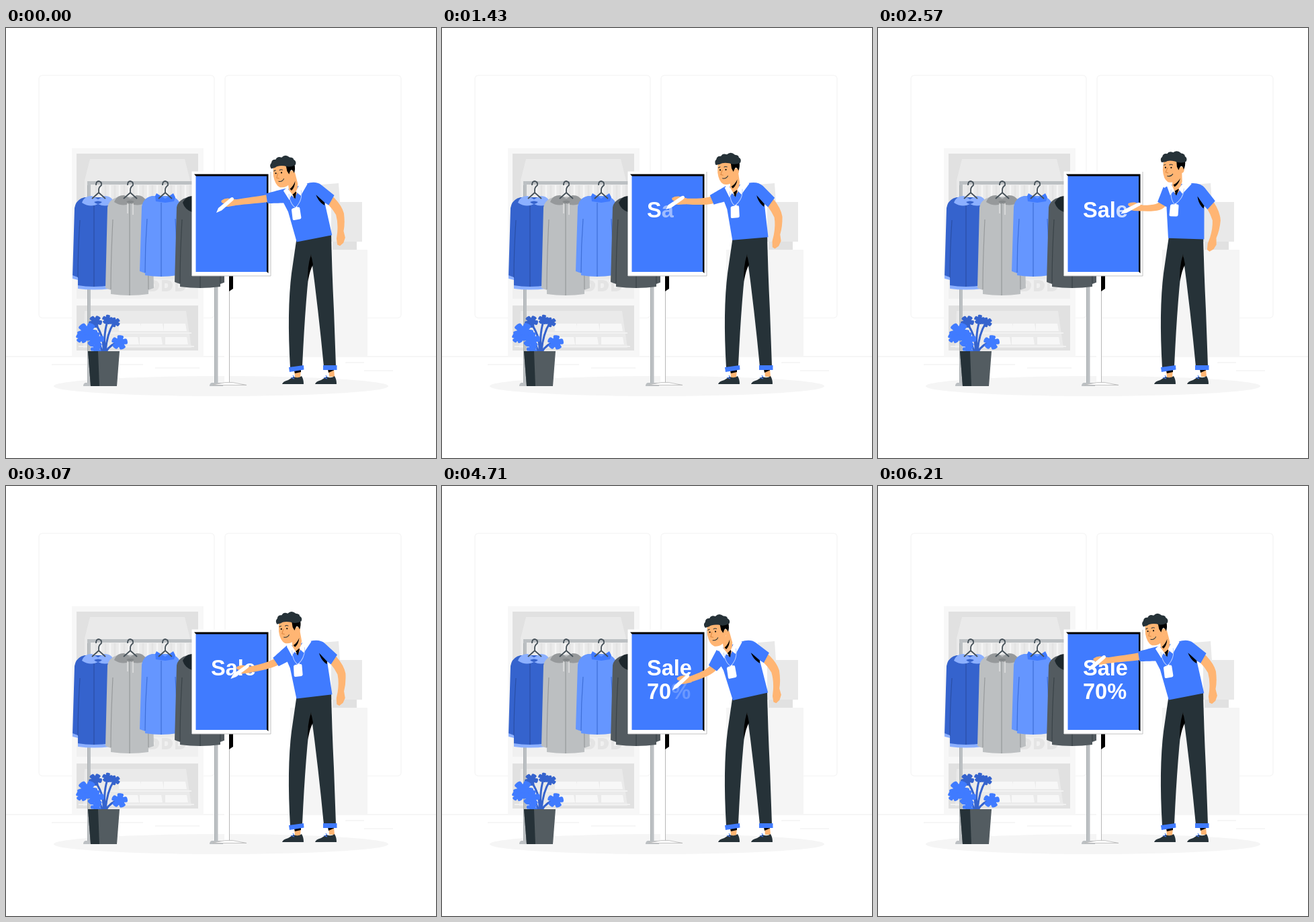
Write an HTML page that moves like this. It is 640 px wide and 640 px high and loops after 6430 ms.

```html
<!DOCTYPE html>
<html lang="en">
<head>
<meta charset="utf-8">
<title>Shop sign</title>
<style>
html, body { margin: 0; width: 100%; height: 100%; overflow: hidden; background: #fff; }
svg { display: block; width: 100%; height: 100%; }
.sign { font: bold 32.5px "Liberation Sans", Arial, sans-serif; fill: #fff; }
</style>
</head>
<body>
<svg viewBox="0 0 640 640">
  <!-- wall and floor -->
  <g fill="none" stroke="#f6f6f6" stroke-width="1.5">
    <rect x="49" y="70.5" width="261" height="361" rx="5"/>
    <rect x="326" y="70.5" width="262" height="361" rx="5"/>
    <path d="M0 489H640M68 501H204M222 506H288M505 498H533M533 510H576" stroke="#f3f3f3"/>
  </g>
  <!-- shelf -->
  <path d="M98 179H294V489H98Z" fill="#f7f7f7"/>
  <path d="M105 187H286V403H105ZM105 413H286V480H105Z" fill="#e1e1e1"/>
  <path d="M125 195H266L274 227V400H117V227ZM117 421H268L276 476H115Z" fill="#eaeaea"/>
  <path d="M105 374H286V403H105Z" fill="#f0f0f0"/>
  <g id="folds"></g>
  <g id="crates"></g>
  <!-- counter -->
  <path d="M423 330H538V489H423Z" fill="#f5f5f5"/>
  <path d="M470 233L495 231L497 260H470Z" fill="#e9e9e9"/>
  <path d="M484 259H530V318H484Z" fill="#e9e9e9"/>
  <path d="M486 318H522V330H486Z" fill="#e1e1e1"/>
  <ellipse cx="320" cy="533" rx="249" ry="15" fill="#f5f5f5"/>
  <!-- clothes rail -->
  <path d="M123.500 531V230.500H313V531" fill="none" stroke="#bcc0c3" stroke-width="5"/>
  <path d="M121.500 234V529M310.500 234V529" stroke="#a8adb0"/>
  <path d="M118 528H133Q136 530 135 533H115Q115 529 118 528ZM306 528H321Q324 530 323 533H303Q303 529 306 528Z" fill="#bcc0c3"/>
  <g id="rack"></g>
  <!-- plant -->
  <path d="M145 482Q146 455 130 437M147 482Q145 452 152 434M148 482Q150 455 161 438M143 482Q138 460 121 455M149 482Q155 470 170 467" fill="none" stroke="#3563cd" stroke-width="3"/>
  <g id="leaves"></g>
  <path d="M122 481H169L165 533H126Z" fill="#535c61"/>
  <path d="M122 481H137L139 533H126Z" fill="#263238"/>
  <!-- board -->
  <path d="M325 369H332.500V528H325Z" fill="#fff"/>
  <path d="M332.500 390V528" stroke="#b8b8b8"/>
  <path d="M332 369H338V388L332 392Z"/>
  <path d="M308 531L327 527.500H337L358 531.500H308Z" fill="#fff" stroke="#b5b5b5" stroke-width=".8"/>
  <path d="M276.500 213.500H394V369H276.500Z" fill="#fff"/>
  <path d="M394 214V369H277" fill="none" stroke="#bdbdbd" stroke-width=".9"/>
  <path d="M280 217.500H390.500V365L386 361V222H284Z"/>
  <path d="M282.500 220.500H388V363H282.500Z" fill="#407bff"/>
  <text class="sign" x="305" y="282" id="top"></text>
  <text class="sign" x="305" y="316.5" id="low"></text>
  <!-- legs -->
  <path d="M433 310L484 304Q485 360 488 420L491 503L473 504Q465 420 454 338Q446 395 441 503L423 506Q418 420 425 365Z" fill="#263238"/>
  <path d="M454 337L457 352Q452 361 449.500 377Q448 356 454 337Z"/>
  <path d="M429 509L439 508L438 520H430ZM480 507H488L489 519H481Z" fill="#ffb573"/>
  <path d="M429 510L439 508.500V512L430 514ZM479 508H488V509.500L480 513Z"/>
  <path d="M421 505L443 502L443.500 508.500L422 512ZM472 502H492.500V509H472Z" fill="#407bff"/>
  <g id="shoe"><path d="M411 530Q412 526 420 524L428 519Q435 522 440 518Q443 523 443 530Z" fill="#263238"/><path d="M424 520L429 522M427 517L429 520" stroke="#407bff" stroke-width="1.2"/></g>
  <use href="#shoe" x="49"/>
  <!-- writing arm -->
  <path id="fore" fill="#ffb573"/>
  <path id="sleeve" fill="#407bff"/>
  <g id="hand">
    <path d="M29 -20L17 -21.500Q11 -21 7.500 -18Q7 -14 12 -14L8 -11Q11 -8.500 18 -9L29 -11Z" fill="#ffb573"/>
    <path d="M0 0L3 -7L20.500 -21.500Q24 -24 25.500 -22Q27 -20 24 -17.500L8 -3.500Z" fill="#fff"/>
  </g>
  <!-- upper body, drawn upright -->
  <g id="body">
    <path d="M488 267L498 258Q508 272 509 285Q508 300 503.500 311L504 321L500 328L494 331.500L490.500 329L491 320L494 311Q498 297 497 285Q494 276 488 267Z" fill="#ffb573"/>
    <path d="M425 238L433 234L462 231Q477 229 484 237L500 256L489 269L484 264L485.500 313.500H432L428 267L423 250Z" fill="#407bff"/>
    <path d="M473.500 250Q475 261 483 268L484 264Z"/>
    <path d="M436 224L449 211L450 229L446 243L441 249L435 240Z" fill="#ffb573"/>
    <path d="M437 234Q443 231 447 224Q445 233 439 237ZM446 239L442 250L438 244Z"/>
    <path d="M433 231L441 247L437 244L433 250L427 235ZM450 233L459 224L464 232L451 247L445 240Z" fill="#fff"/>
    <path d="M434 241Q433 257 440 263Q453 254 453 239" fill="none" stroke="#b9d0ff"/>
    <path d="M437 263H440Q442 260 443 263H444Q446 263 446 265L445.500 279Q445 281 443 281H434.500Q432.500 281 432.500 279L433.500 265Q434 263 437 263Z" fill="#fff"/>
    <g id="head">
      <path d="M421 198L420 212Q421 226 428 230Q437 232 443 226L447 216Q452 217 452 210Q450 205 446 208L445 197Z" fill="#ffb573"/>
      <path d="M440 197H453Q454 206 451 211Q450 206 447 206Q445 208 443.500 212L441 207Z"/>
      <path d="M418 201Q415 196 419 192.500Q420 187 426 188Q429 183 435 186Q441 181 447 187Q453 188 452.500 191Q457 194 454.500 199Q446 203 438 199Q428 197 424 200Z" fill="#263238"/>
      <g fill="none" stroke="#263238" stroke-linecap="round">
        <path d="M421.500 205L424 204M430 204.500Q432 203 434.500 204.500"/>
        <path d="M427 209L424.500 215.500L428 216.500" stroke="#d9863f"/>
        <path d="M427 221Q432 222.500 435 218"/>
      </g>
      <circle cx="424" cy="208.500" r="1.100"/><circle cx="432.500" cy="208.500" r="1.100"/>
    </g>
  </g>
</svg>
<script>
const $ = id => document.getElementById(id);
const svgNS = 'http://www.w3.org/2000/svg';
const path = (d, fill, extra = '') => `<path d="${d}" fill="${fill}" ${extra}/>`;
const line = (d, color, w = 1) => path(d, 'none', `stroke="${color}" stroke-width="${w}"`);

// ---- still props ----
function hanger(x) {
  return line(`M${x - 4} 234Q${x - 4} 228 ${x} 228Q${x + 5} 229 ${x + 4} 234Q${x} 237 ${x} 241V245L${x - 10} 254M${x} 245L${x + 10} 254`, '#455058', 1.8);
}

function jacket(cx, top, hw, cuff, hem, body, shade) {
  const l = cx - hw, r = cx + hw;
  return path(`M${cx - 14} ${top}Q${l + 5} ${top + 3} ${l + 3} ${top + 16}L${l} ${cuff - 2}L${l + 8} ${cuff + 1}L${l + 8} ${hem - 2}` +
    `Q${cx} ${hem + 2} ${r - 8} ${hem - 2}L${r - 8} ${cuff + 1}L${r} ${cuff - 2}L${r - 3} ${top + 16}Q${r - 5} ${top + 3} ${cx + 14} ${top}Z`, body) +
    line(`M${l + 11} ${top + 34}Q${l + 8} ${cuff - 40} ${l + 8} ${cuff}M${r - 11} ${top + 34}Q${r - 8} ${cuff - 40} ${r - 8} ${cuff}M${cx} ${top + 10}V${hem}`, shade, 1.2);
}

function hood(x, y, fill, inner) {
  return path(`M${x - 24} ${y + 8}Q${x - 20} ${y - 3} ${x - 9} ${y - 2}L${x} ${y + 3}L${x + 9} ${y - 2}Q${x + 20} ${y - 3} ${x + 24} ${y + 8}Q${x + 12} ${y + 16} ${x} ${y + 10}Q${x - 12} ${y + 16} ${x - 24} ${y + 8}Z`, fill) +
    path(`M${x - 6} ${y + 7}Q${x} ${y + 4} ${x + 6} ${y + 7}Q${x} ${y + 13} ${x - 6} ${y + 7}Z`, inner);
}

let strips = '';
for (let x = 134; x < 276; x += 7) strips += line(`M${x} 234V256`, x % 2 ? '#f5f5f5' : '#e3e3e3', 2.5);
$('rack').innerHTML = strips +
  jacket(131, 252, 32, 372, 388, '#3563cd', '#2a4fa6') +
  path('M107 383Q130 387 156 383V388Q130 391 107 388ZM99 368L107 371V375L99 373Z', '#8cb0ff') +
  hood(137, 252, '#8cb0ff', '#3563cd') +
  jacket(184, 251, 36, 389, 398, '#bcbfc1', '#96999b') +
  hood(185, 251, '#96999b', '#84888a') +
  line('M181 261V276M189 261V278', '#e5e5e5', 1.3) +
  jacket(231, 250, 32, 364, 370, '#6596ff', '#3e6fd8') +
  path('M222 250L224 246L237 254L249 246L252 252L250 258L237 260L223 258Z', '#407bff') +
  jacket(289, 251, 38, 380, 387, '#535b60', '#3a4348') +
  path('M263 260Q268 250 277 250V274Q266 270 263 260Z', '#1d272c') +
  [138, 185, 237].map(hanger).join('');

$('folds').innerHTML = [212, 232, 252].map(x =>
  path(`M${x} 375H${x + 8}Q${x + 17} 377 ${x + 16} 384Q${x + 15} 391 ${x + 7} 392H${x}Z`, '#e4e4e4') +
  path(`M${x + 4} 380H${x + 8}Q${x + 11} 384 ${x + 7} 387H${x + 4}Z`, '#f0f0f0')).join('');

$('crates').innerHTML = [[168, 440], [201, 440], [235, 440], [164, 460], [199, 460], [237, 460]].map(([x, y]) =>
  path(`M${x} ${y}h32l2 11h-34Z`, '#f7f7f7')).join('') + line('M108 454H276M108 474H280', '#f1f1f1', 2);

// A leaf is a disc with a few narrow notches.
function leaf(x, y, size, turn, color) {
  let d = '';
  for (let i = 0; i <= 60; i++) {
    const a = i / 60 * Math.PI * 2;
    const r = size * (1 - 0.4 * Math.abs(Math.cos(a * 2.5 + turn)) ** 14);
    d += `${i ? 'L' : 'M'}${(x + r * Math.cos(a)).toFixed(1)} ${(y + r * 0.9 * Math.sin(a)).toFixed(1)}`;
  }
  return path(d + 'Z', color);
}
$('leaves').innerHTML =
  leaf(133, 437, 10, 1, '#3563cd') + leaf(151, 434, 8, 2, '#3563cd') + leaf(162, 438, 8, 0, '#3563cd') +
  leaf(121, 452, 15, 1, '#407bff') + leaf(113, 461, 9, 2, '#407bff') + leaf(133, 464, 13, 2, '#407bff') +
  leaf(134, 478, 8, 0, '#407bff') + leaf(169, 468, 12, 2, '#407bff');

// ---- lettering: [row, glyph, fade start, fade end] ----
const glyphs = [
  ['top', 'S', 860, 1250], ['top', 'a', 1280, 1580], ['top', 'l', 1750, 2060], ['top', 'e', 2200, 2700],
  ['low', '7', 3600, 4000], ['low', '0', 4150, 4550], ['low', '%', 4600, 5050]
].map(([row, ch, from, to]) => {
  const el = document.createElementNS(svgNS, 'tspan');
  el.textContent = ch;
  $(row).append(el);
  return { el, from, to };
});

// ---- pose: [time, pen x, pen y, body lean] ----
const keys = [
  [720, 313, 275, -11], [980, 323, 263, -9.5], [1220, 313, 279, -8], [1430, 333, 270, -4.8],
  [1600, 337, 280, -3], [1800, 345, 267, -1.2], [2070, 352, 269, 0], [2210, 353, 279, 0.8],
  [2420, 362, 268, 2], [2640, 361, 281, 1.6], [2790, 366, 279, 0.6], [3070, 334, 287, -7],
  [3480, 313, 296, -13.3], [3650, 323, 296, -15.2], [3790, 320, 304, -16], [3940, 315, 316, -15.4],
  [4200, 329, 300, -13.5], [4400, 331, 315, -13], [4560, 338, 300, -12.8], [4705, 343, 304, -12.5],
  [4950, 362, 298, -11], [5130, 352, 315, -11], [5340, 366, 310, -11], [5640, 337, 288, -11],
  [6210, 313, 275, -11]
];

function pose(t) {
  const last = keys.length - 1;
  if (t <= keys[0][0]) return keys[0].slice(1);
  if (t >= keys[last][0]) return keys[last].slice(1);
  const i = keys.findIndex(k => k[0] > t) - 1;
  const a = keys[i], b = keys[i + 1], span = b[0] - a[0], u = (t - a[0]) / span;
  const slope = (j, c) => j < 1 || j >= last ? 0 : (keys[j + 1][c] - keys[j - 1][c]) / (keys[j + 1][0] - keys[j - 1][0]) * span;
  return [1, 2, 3].map(c => {
    const m = slope(i, c), n = slope(i + 1, c), d = b[c] - a[c];
    return a[c] + u * (m + u * (3 * d - 2 * m - n + u * (m + n - 2 * d)));
  });
}

const mix = (a, b, u) => [a[0] + (b[0] - a[0]) * u, a[1] + (b[1] - a[1]) * u];

function spin([x, y], deg) {
  const c = Math.cos(deg * Math.PI / 180), s = Math.sin(deg * Math.PI / 180);
  return [x * c - y * s, x * s + y * c];
}

// Outline of a curved limb whose width runs from w0 to w1.
function limb(a, b, c, w0, w1) {
  const left = [], right = [], n = 10;
  for (let i = 0; i <= n; i++) {
    const u = i / n, p = mix(a, b, u), q = mix(b, c, u), m = mix(p, q, u);
    const dx = q[0] - p[0], dy = q[1] - p[1], k = (w0 + (w1 - w0) * u) / 2 / (Math.hypot(dx, dy) || 1);
    left.push([m[0] - dy * k, m[1] + dx * k]);
    right.unshift([m[0] + dy * k, m[1] - dx * k]);
  }
  return 'M' + [...left, ...right].map(p => p.map(v => v.toFixed(2)).join(' ')).join('L') + 'Z';
}

const LOOP = 6430, START = 790, STEP = 71.1, LAST = 76;
const PIVOT = [458, 312], CROWN = [437, 172];

function draw(time) {
  const now = time % LOOP;
  const t = now < START ? 0 : START + Math.min(LAST, Math.floor((now - START) / STEP)) * STEP;
  const [x, y, lean] = pose(t);
  const s = spin([-26, -69], lean), w = spin([25, -15], lean + 11);
  const shoulder = [PIVOT[0] + s[0], PIVOT[1] + s[1]];
  const wrist = [x + w[0], y + w[1]];
  const dx = wrist[0] - shoulder[0], dy = wrist[1] - shoulder[1], d = Math.hypot(dx, dy);
  const bow = Math.max(0, 83 - d) * 0.5, mid = mix(shoulder, wrist, 0.5);
  const elbow = [mid[0] + dy / d * bow, mid[1] - dx / d * bow];
  const cuff = mix(shoulder, elbow, 0.77), inner = mix(shoulder, elbow, 0.65);

  $('body').setAttribute('transform', `rotate(${lean} ${PIVOT})`);
  // The head keeps part of its upright angle.
  $('head').setAttribute('transform', `rotate(${-lean * 0.45} ${CROWN})`);
  $('hand').setAttribute('transform', `translate(${x} ${y}) rotate(${lean + 11})`);
  $('fore').setAttribute('d', limb(inner, mix(elbow, mix(inner, wrist, 0.4), -0.3), wrist, 11.5, 8.5));
  $('sleeve').setAttribute('d', limb(shoulder, mix(shoulder, cuff, 0.5), cuff, 22, 15));
  for (const g of glyphs) g.el.setAttribute('fill-opacity', Math.max(0, Math.min(1, (t - g.from) / (g.to - g.from))));
}

let begin;
function tick(now) {
  begin ??= now;
  draw(now - begin);
  requestAnimationFrame(tick);
}
draw(0);
requestAnimationFrame(tick);
</script>
</body>
</html>
```
